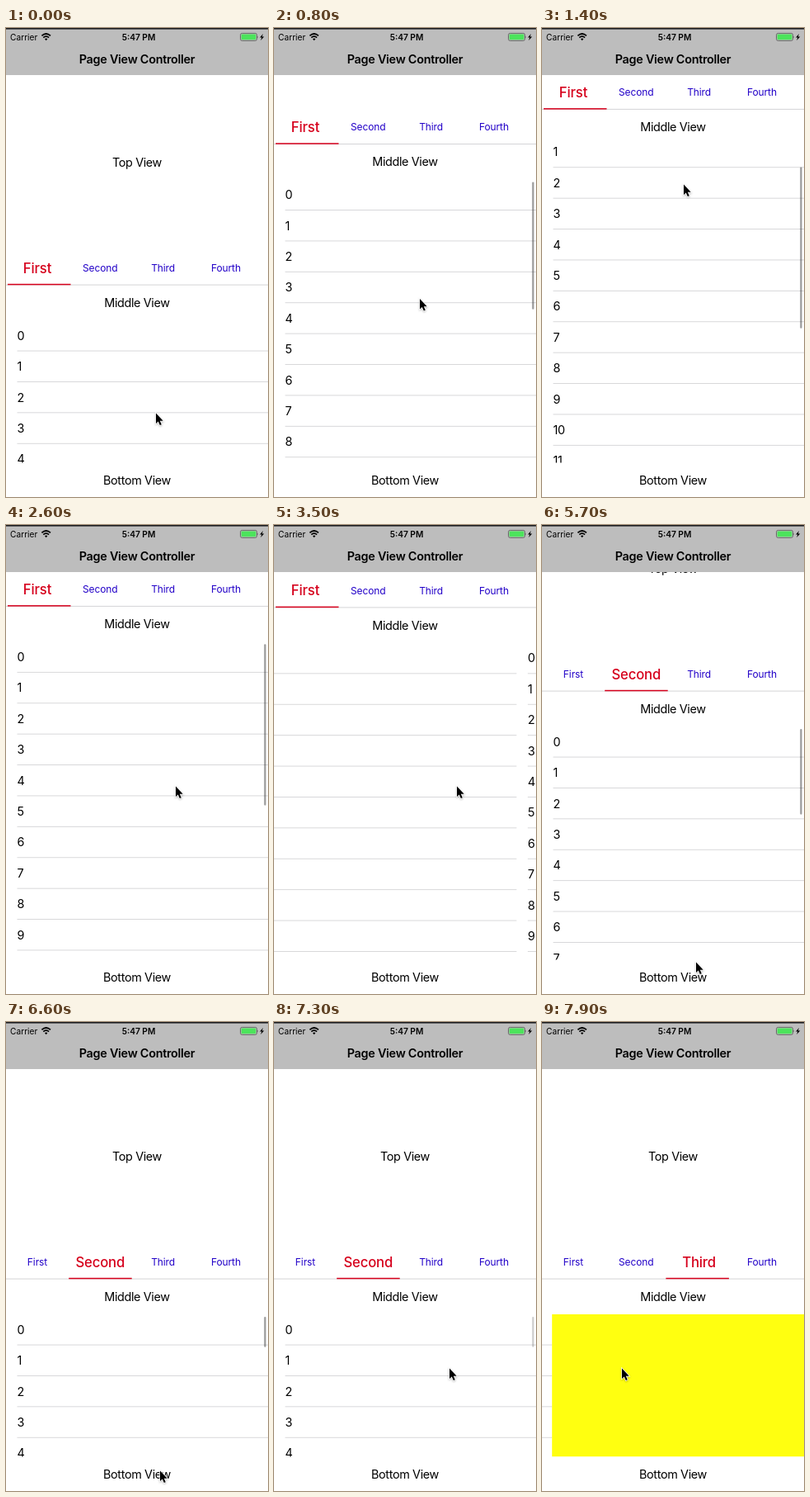
These frames come from a looping animation (318 px wide and 568 px high, 8 s). An HTML page:

```html
<!DOCTYPE html>
<html lang="en">
<head>
<meta charset="utf-8">
<title>Page View Controller</title>
<style>
  html, body { margin: 0; width: 100%; height: 100%; overflow: hidden; background: #fff; }
  svg { display: block; width: 318px; height: 568px; font: 14.4px Inter, sans-serif; letter-spacing: -.37px; }
  .mid { text-anchor: middle; }
  .title { font-weight: 600; letter-spacing: -.27px; }
  .status { font-size: 10.2px; letter-spacing: 0; }
  .time { font-weight: 600; }
  .tab { font-size: 12px; letter-spacing: -.1px; text-anchor: middle; }
  .rule { fill: #d4d4d6; }
  #cursor { filter: drop-shadow(0 1px 1px #0004); }
</style>
</head>
<body>
<svg viewBox="0 0 318 568">
  <defs><clipPath id="clip"><rect id="window" width="318"/></clipPath></defs>
  <g id="header">
    <text class="mid" x="159" y="168">Top View</text>
    <rect class="rule" y="310.6" width="318" height="1"/>
    <g id="tabs"></g>
    <rect id="line" y="309.8" width="76.5" height="1.5" fill="#d6001c"/>
    <text class="mid" x="159" y="338">Middle View</text>
  </g>
  <g clip-path="url(#clip)">
    <g id="pages"></g>
    <rect id="bar" x="313.3" width="2.2" rx="1.1" fill="#000" fill-opacity=".4"/>
  </g>
  <text class="mid" x="159" y="553">Bottom View</text>
  <rect width="318" height="57" fill="#bdbdbd"/>
  <rect width="318" height="1.6" fill="#1c1c1e"/>
  <text class="status" x="5" y="14.6">Carrier</text>
  <g fill="none" stroke="#000" stroke-width="1.7">
    <path d="M43.4 9.4q5.3-4.8 10.6 0M45.3 11.6q3.4-3 6.8 0"/>
    <path d="M48.7 15.2l-1.7-1.9q1.7-1.4 3.4 0z" fill="#000" stroke="none"/>
  </g>
  <text class="status time mid" x="161" y="14.6">5:47 PM</text>
  <rect x="284.5" y="6.4" width="20" height="9" rx="2" fill="none" stroke="#555" stroke-width=".8"/>
  <rect x="285.6" y="7.5" width="17.8" height="6.8" rx="1" fill="#4ce45c"/>
  <path d="M305.4 9.4q1.4 1.5 0 3z" fill="#555"/>
  <path d="M312 7l-4 4.4h2.3l-1.2 3.6 4.2-4.6h-2.5z"/>
  <text class="mid title" x="159" y="43">Page View Controller</text>
  <path id="cursor" d="M0 .4v12.6l2.8-2.6 2 4.7 2-.9-2-4.5h3.9z" stroke="#fff" stroke-width="1.4" paint-order="stroke"/>
</svg>
<script>
const LOOP = 8000, STEP = 100, TRAVEL = 212.7, WIDTH = 318;
const ROW = 37.4, ROWS = 20, LIST_TOP = 354, LIST_END = 526.5;
const RED = [214, 0, 28], BLUE = [34, 0, 200];

const $ = id => document.getElementById(id);

function set(el, attrs) {
  for (const key in attrs) el.setAttribute(key, attrs[key]);
  return el;
}

function add(parent, tag, attrs, text = "") {
  const el = set(document.createElementNS("http://www.w3.org/2000/svg", tag), attrs);
  el.textContent = text;
  return parent.appendChild(el);
}

const tabs = ["First", "Second", "Third", "Fourth"].map(name =>
  add($("tabs"), "text", { class: "tab", y: 4.3 }, name));

const lists = [0, 1].map(page => {
  const list = add($("pages"), "g");
  for (let i = 0; i < ROWS; i++) {
    const top = i * ROW, x = page * WIDTH + 13.5;
    add(list, "text", { x, y: top + 23.7 }, i);
    add(list, "rect", { class: "rule", x, y: top + 36.6, width: WIDTH - 13.5, height: .9 });
  }
  return list;
});
const panel = add($("pages"), "rect", { x: 2 * WIDTH, width: WIDTH, fill: "#ffff10" });

// The state at time t: each value is a sum of eased moves.
function pose(t) {
  const go = (from, to, by = 1) => {
    const k = Math.min(1, Math.max(0, (t - from) / (to - from)));
    return by * k * k * (3 - 2 * k);
  };
  return {
    open: TRAVEL - go(300, 1000, TRAVEL) + go(2600, 2800, 1.5) + go(5000, 6440, TRAVEL - 1.5),
    scroll: go(1000, 1800, 94) - go(2200, 2600, 94),
    page: go(3400, 4000) + go(7450, 7960),
    tab: go(3600, 3800) + go(7600, 7800),
    bar: go(200, 300) - go(2800, 3100) + go(4500, 4600) - go(7000, 7600),
    x: 182 - go(200, 1400, 10) + go(2100, 2600, 34) + go(2700, 3200, 34) - go(3400, 3800, 115)
      + go(4000, 4600, 79) - go(4700, 5700, 17) + go(6800, 7300, 26) - go(7400, 7800, 116),
    y: 466 - go(200, 1400, 277) + go(2200, 2600, 127) + go(4000, 4600, 34)
      + go(4700, 5700, 179) + go(5700, 6000, 14) - go(6800, 7300, 124)
  };
}

function draw(t) {
  const now = pose(t), shift = now.open - TRAVEL;
  const top = LIST_TOP + shift, height = LIST_END - top;

  set($("header"), { transform: `translate(0 ${shift})` });
  tabs.forEach((el, i) => {
    const on = Math.max(0, 1 - Math.abs(now.tab - i));
    const mix = BLUE.map((c, k) => Math.round(c + (RED[k] - c) * on));
    set(el, {
      transform: `translate(${38 + 76.3 * i} 290.6) scale(${1 + .39 * on})`,
      fill: `rgb(${mix})`,
      "font-weight": on > .5 ? 500 : 400
    });
  });
  set($("line"), { x: 2 + 74.2 * now.tab });

  set($("window"), { y: top, height });
  set($("pages"), { transform: `translate(${-now.page * WIDTH} ${top})` });
  set(lists[0], { transform: `translate(0 ${-now.scroll})` });
  set(panel, { height });

  const ratio = height / (ROW * ROWS);
  set($("bar"), { y: top + 3 + now.scroll * ratio, height: height * ratio - 3, opacity: now.bar });
  set($("cursor"), { transform: `translate(${now.x} ${now.y})` });
}

function tick() {
  draw(Math.floor(performance.now() % LOOP / STEP) * STEP);
  requestAnimationFrame(tick);
}
tick();
</script>
</body>
</html>
```
